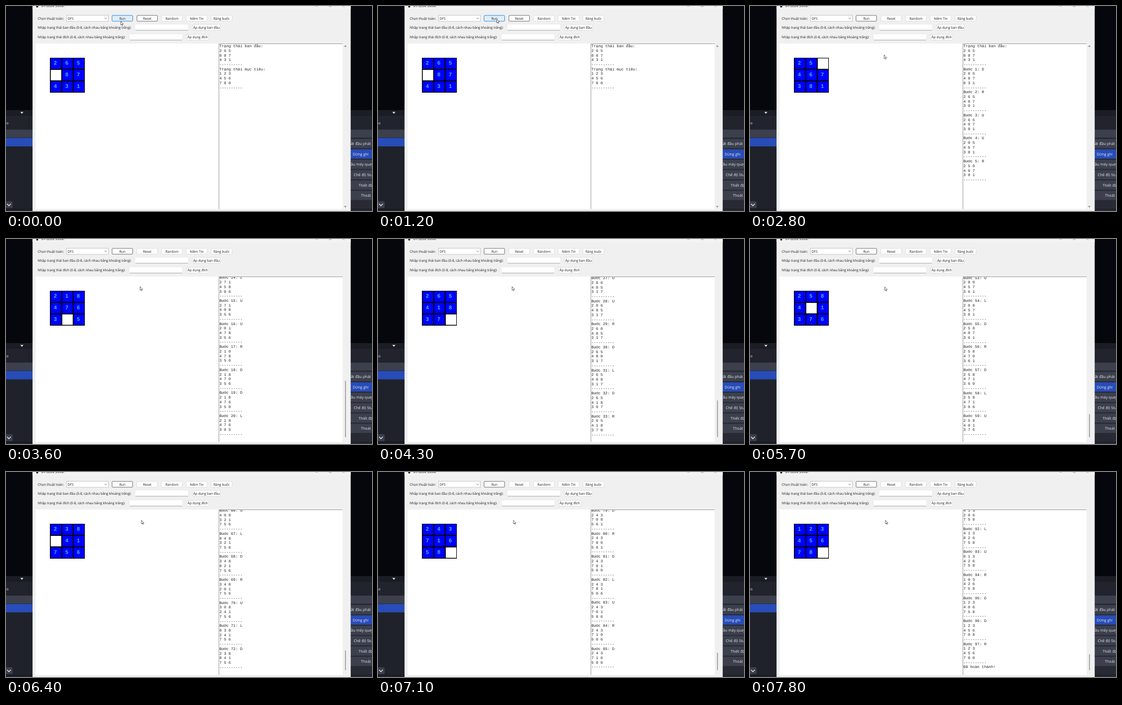
Recreate the animation shown at these times as an HTML page. Size 692 by 388 pixels, loop 8.3 s.

```html
<!DOCTYPE html>
<html lang="vi">
<head>
<meta charset="utf-8">
<title>8-Puzzle Solver</title>
<style>
  html, body { margin: 0; width: 100%; height: 100%; overflow: hidden; background: #1d1f26; }
  svg { position: absolute; left: 0; top: 0; }
  text { font: 6.28px "Open Sans", "Noto Sans", sans-serif; fill: #1a1a1a; text-rendering: geometricPrecision; }
  .mid { text-anchor: middle; }
  .side { font-size: 7.1px; fill: #e4e6ea; }
  .tile { font: bold 10px "Liberation Sans", Arial, sans-serif; fill: #3fbdf0; text-anchor: middle; }
  #view { position: absolute; left: 403.4px; top: 72px; width: 232px; height: 311px; overflow: hidden; }
  #log { margin: 0; padding-top: 1.1px; font: 7.28px/8.72px "Liberation Mono", "Courier New", monospace; color: #222; text-rendering: geometricPrecision; }
</style>
</head>
<body>
<svg id="stage" width="692" height="388" viewBox="0 0 692 388"></svg>
<div id="view"><pre id="log"></pre></div>
<svg width="692" height="388" viewBox="0 0 692 388">
  <path id="cursor" d="M0 0V7L1.6 5.5 2.7 8 3.8 7.5 2.7 5.2H4.9Z" fill="#fff" stroke="#333" stroke-width=".7"/>
</svg>
<script>
const LOOP = 8300, LINE = 8.72, RULE = "----------";
const $ = id => document.getElementById(id);

// ---- puzzle ----
const START = "265087431", GOAL = "123456780";
const SHIFT = { U: -3, D: 3, L: -1, R: 1 };

function move(board, dir) {
  const i = board.indexOf("0"), j = i + SHIFT[dir];
  const sameRow = (i / 3 | 0) === (j / 3 | 0);
  if (j < 0 || j > 8 || ("LR".includes(dir) && !sameRow)) return null;
  const cells = [...board];
  [cells[i], cells[j]] = [cells[j], cells[i]];
  return cells.join("");
}

// Depth-first search for a route of an exact length
function find(board, goal, left, seen) {
  if (!left) return board === goal ? "" : null;
  for (const dir of "DURL") {
    const next = move(board, dir);
    if (!next || seen.includes(next)) continue;
    const rest = find(next, goal, left - 1, [...seen, next]);
    if (rest !== null) return dir + rest;
  }
  return null;
}

const boards = [START];
let route = "";
function follow(dirs) {
  for (const dir of dirs) boards.push(move(boards.at(-1), dir));
  route += dirs;
}
follow("DRUURDDL" + "UURDDL".repeat(3) + "UURDLD" + "RUULDD".repeat(3) + "RUULDRDLUULDDRUULDRULD");
follow(find(boards.at(-1), "413206758", 19, boards.slice(-2)));
follow("LURDDR");

const block = (title, board) =>
  [title, ...board.match(/.../g).map(row => [...row].join(" ")), RULE];
const intro = block("Trạng thái ban đầu:", START);
const idle = [...intro, ...block("Trạng thái mục tiêu:", GOAL)];
const steps = [...route].map((dir, i) => block(`Bước ${i + 1}: ${dir}`, boards[i + 1]));

// ---- drawing helpers ----
const rect = (x, y, w, h, fill, more = "") =>
  `<rect x="${x}" y="${y}" width="${w}" height="${h}" fill="${fill}" ${more}/>`;
const text = (x, y, str, cls = "") => `<text x="${x}" y="${y}" class="${cls}">${str}</text>`;
const line = (d, color, width = 1) =>
  `<path d="${d}" fill="none" stroke="${color}" stroke-width="${width}"/>`;
const button = (x, y, w, label, id = "") =>
  rect(x + .5, y + .5, w - 1, 11, "#fdfdfd", `id="${id}" rx="1.5" stroke="#dadada" stroke-width=".8"`) +
  text(x + w / 2, y + 8.3, label, "mid");
const entry = (x, y) =>
  rect(x, y, 101, 11.6, "#fff", 'rx="1.5" stroke="#e2e2e2" stroke-width=".6"') +
  line(`M${x + 1} ${y + 11.4}h99`, "#999", .8);

function backdrop() {
  const labels = [[647.3, "Bắt đầu phát"], [655.5, "Dừng ghi"], [652, "ầu máy quay"],
                  [657.5, "Chế độ Studio"], [666.5, "Thiết đặt"], [671, "Thoát"]];
  const side = labels.map(([x, label], i) => {
    const y = 251.7 + i * 19.6;
    return rect(640, y, 60, 17.5, i === 1 ? "#284cb8" : "#3c404d") + text(x, y + 11.5, label, "side");
  }).join("");
  return rect(0, 0, 692, 388, "#1f222a") + rect(0, 0, 692, 197, "#06070c") +
    rect(0, 197, 692, 11, "#1b1d24") + rect(0, 208, 692, 26, "#21242c") +
    rect(0, 234, 692, 15, "#3c404d") + rect(0, 249.7, 51, 16, "#284cb8") +
    rect(651, 249, 41, 139, "#272a33") +
    line("M43.5 211V232", "#14161b") + line("M0 384.5H692", "#14161b") +
    '<path d="M27 200.5h6l-3 3.5z" fill="#eee"/>' +
    text(0.5, 223.5, "o", "side") + rect(-2, 369.5, 14.5, 13, "#3c404d", 'rx="1.5"') +
    line("M2 374.5l3.5 3.5 3.5-3.5", "#eee", 1.3) + side;
}

function app() {
  return rect(50.2, 0, 601.5, 388, "#f0f0f0") + rect(50.2, 0, 601.5, 6, "#f3f3f3") +
    '<circle cx="59" cy="1" r="2" fill="#26303c"/>' + text(67, 2.3, "8-Puzzle Solver") +
    line("M584.5 .3h5M611 -3h4v4.3h-4zM636 -2.5l4.6 4.6M640.6 -2.5l-4.6 4.6", "#999", .7) +
    text(60, 25.8, "Chọn thuật toán:") +
    rect(114.5, 17.5, 79, 11.5, "#fff", 'stroke="#bbb" stroke-width=".8"') +
    text(116.5, 25.8, "DFS") + line("M186.3 22.3l2.2 2.2 2.2-2.2", "#555", .8) +
    button(200, 17.3, 40, "Run", "run") + button(247, 17.3, 40, "Reset", "reset") +
    button(293.5, 17.3, 40.5, "Random") + button(340, 17.3, 41, "Niềm Tin") +
    button(387, 17.3, 41, "Ràng buộc") +
    text(60, 42.7, "Nhập trạng thái ban đầu (0-8, cách nhau bằng khoảng trắng):") +
    entry(244, 34.4) + button(352, 34.4, 54, "Áp dụng ban đầu") +
    text(60, 61.2, "Nhập trạng thái đích (0-8, cách nhau bằng khoảng trắng):") +
    entry(233, 53) + button(341, 53, 43, "Áp dụng đích") +
    rect(56, 71, 345.5, 313, "#fff") + rect(402, 71, 234.5, 313, "#fff") +
    line("M402.7 384V71.5H636.5", "#929292", .9) +
    '<path id="arrows" d="M639.3 77.3h4.6l-2.3-3.2zM639.3 378.6h4.6l-2.3 3.2z" fill="#8c8c8c"/>' +
    rect(641.2, 0, 1.3, 0, "#858585", 'id="thumb" rx=".6"');
}

function grid() {
  let out = rect(83, 98, 66, 66, "#000");
  for (let i = 0; i < 9; i++) {
    const x = 84.6 + i % 3 * 21.8, y = 99.1 + (i / 3 | 0) * 21.8;
    out += rect(x, y, 19.8, 19.8, "#00f", `id="cell${i}"`) +
      `<text id="num${i}" class="tile" x="${x + 8.6}" y="${y + 12.2}"></text>`;
  }
  return out;
}

$("stage").innerHTML = backdrop() + app() + grid();

// ---- motion ----
const trail = [[0, 217, 29], [800, 219, 34], [1200, 224.5, 25], [1600, 224.5, 25],
               [2400, 253.5, 92.5], [2800, 253.5, 92.5], [3500, 253.5, 90],
               [5300, 253.5, 90], [6100, 256, 91.2], [LOOP, 256, 91.2]];

function pointer(t) {
  const k = trail.findIndex(p => p[0] > t);
  const [t0, x0, y0] = trail[k - 1], [t1, x1, y1] = trail[k];
  let f = (t - t0) / (t1 - t0);
  f = f * f * (3 - 2 * f);
  return [x0 + (x1 - x0) * f, y0 + (y1 - y0) * f];
}

function style(el, fill, stroke) {
  el.setAttribute("fill", fill);
  el.setAttribute("stroke", stroke);
}

function draw(t) {
  const [x, y] = pointer(t);
  $("cursor").setAttribute("transform", `translate(${x} ${y})`);

  const clicked = t >= 1700;
  const hover = x > 200 && x < 240 && y > 17 && y < 30;
  if (hover) style($("run"), "#e0eef9", "#0078d4");
  else style($("run"), "#fdfdfd", clicked ? "#555" : "#dadada");
  style($("reset"), "#fdfdfd", clicked ? "#dadada" : "#555");

  const count = t < 2600 ? 0 : Math.floor(5.4 + (t - 2800) / 53.6);
  const step = Math.min(count, steps.length);
  [...boards[step]].forEach((n, i) => {
    $("cell" + i).setAttribute("fill", n === "0" ? "#fff" : "#00f");
    $("num" + i).textContent = n === "0" ? "" : n;
  });

  const lines = step ? [...intro, ...steps.slice(0, step).flat()] : idle.slice();
  if (count > steps.length) lines.push("Đã hoàn thành!");
  const scroll = Math.max(0, (lines.length - 1) * LINE - 294.2);
  $("log").textContent = lines.join("\n");
  $("log").style.transform = `translateY(${-scroll}px)`;

  // The arrows give way to a thin thumb once the log overflows
  const part = 36 / (lines.length + 1), top = 366 - 288 * part;
  $("arrows").setAttribute("opacity", part < 1 ? 0 : 1);
  $("thumb").setAttribute("y", top);
  $("thumb").setAttribute("height", part < 1 ? 375 - top : 0);
}

const begin = performance.now();
let shown = -1;
function tick() {
  const t = Math.floor((performance.now() - begin) % LOOP / 100) * 100;
  if (t !== shown) draw(shown = t);
  requestAnimationFrame(tick);
}
tick();
</script>
</body>
</html>
```
